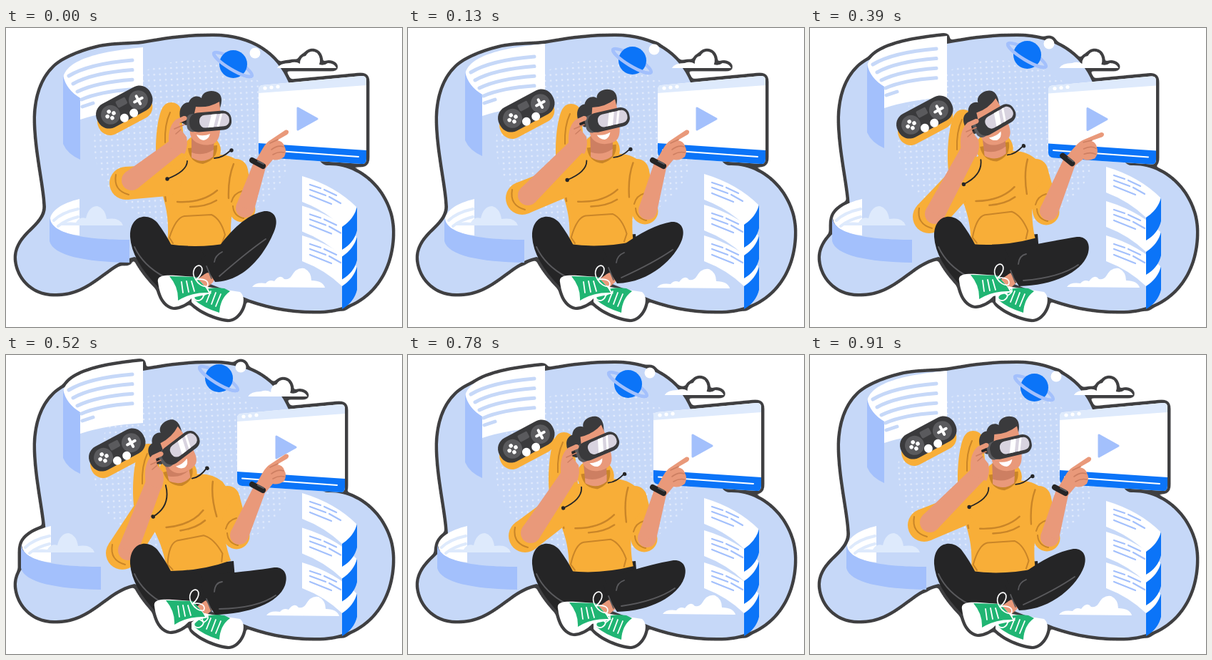
An HTML page that plays this animation: 555x418 px, repeating every 1040 ms.

```html
<!DOCTYPE html>
<html>
<head>
<meta charset="utf-8">
<style>
html, body { margin: 0; height: 100%; overflow: hidden; background: #fff }
svg { display: block; width: 100vw; height: 100vh }
.line { fill: none; stroke-linecap: round; stroke-linejoin: round }
</style>
</head>
<body>
<svg viewBox="0 0 555 418">
  <defs>
    <pattern id="dots" width="8" height="8" patternUnits="userSpaceOnUse" patternTransform="rotate(-3)">
      <circle cx="4" cy="4" r="1.3" fill="#e3ecfc"/>
    </pattern>
    <!-- round outline about 4px wide around everything drawn -->
    <filter id="sticker" filterUnits="userSpaceOnUse" x="0" y="0" width="555" height="418" color-interpolation-filters="sRGB">
      <feGaussianBlur in="SourceAlpha" stdDeviation="3"/>
      <feComponentTransfer result="grown"><feFuncA type="linear" slope="20" intercept="-1.12"/></feComponentTransfer>
      <feFlood flood-color="#3f3f41"/>
      <feComposite in2="grown" operator="in"/>
      <feMerge><feMergeNode/><feMergeNode in="SourceGraphic"/></feMerge>
    </filter>
    <clipPath id="lens"><rect x="271" y="121" width="42" height="18" rx="8"/></clipPath>
  </defs>
  <g id="art" filter="url(#sticker)"></g>
</svg>
<script>
const SKIN = '#e9997a', SHADE = '#cd7f62', YELLOW = '#f8ae38', FOLD = '#c98528', DARK = '#3a3a3c',
  BLACK = '#252526', GREY = '#5a5a5d', BLUE = '#0b74f8', SOFT = '#a3c0fc', PALE = '#deeafc',
  SKY = '#c6d8f8', GREEN = '#20b573', WHITE = '#fff';

const shape = (d, fill) => `<path d="${d}" fill="${fill}"/>`;
const line = (d, color, width = 2) => `<path class="line" d="${d}" stroke="${color}" stroke-width="${width}"/>`;
const disc = (x, y, r, fill) => `<circle cx="${x}" cy="${y}" r="${r}" fill="${fill}"/>`;
const oval = (x, y, rx, ry, fill) => `<ellipse cx="${x}" cy="${y}" rx="${rx}" ry="${ry}" fill="${fill}"/>`;
const box = (x, y, w, h, r, fill) => `<rect x="${x}" y="${y}" width="${w}" height="${h}" rx="${r}" fill="${fill}"/>`;
const group = (transform, ...parts) => `<g transform="${transform}">${parts.join('')}</g>`;
const move = (x, y, ...parts) => group(`translate(${x} ${y})`, ...parts);

// Tapered limb with round ends
function limb([x1, y1], r1, [x2, y2], r2, fill) {
  const a = Math.atan2(y2 - y1, x2 - x1), s = Math.sin(a), c = Math.cos(a);
  return disc(x1, y1, r1, fill) + disc(x2, y2, r2, fill) +
    shape(`M${x1 - s * r1} ${y1 + c * r1}L${x2 - s * r2} ${y2 + c * r2}L${x2 + s * r2} ${y2 - c * r2}L${x1 + s * r1} ${y1 - c * r1}Z`, fill);
}

const blob = shape('M192 22C215 18 245 12 290 12C345 12 380 38 396 76C410 110 430 192 450 192C500 190 541 235 541 285C541 350 500 394 440 395C400 396 360 388 330 375L240 340L180 320C140 328 120 371 70 371C35 372 15 345 15 320C17 287 56 278 56 250C55 220 42 170 42 125C43 95 51 72 67 56C80 43 106 33 132 27C155 23 175 24 192 22Z', SKY) +
  oval(262, 162, 139, 117, 'url(#dots)');

const paper = shape('M80 72C82 42 140 32 192 27V113Q140 116 104 128V98Q84 86 80 72Z', WHITE) +
  shape('M80 66Q84 86 104 98V184Q86 176 80 162Z', SOFT) +
  [0, 1, 2, 3].map(i => line(`M${88 + i * 6} ${67 + i * 11}Q${116 + i * 5} ${50 + i * 13} 177 ${45 + i * 13.6}`, SKY, 5)).join('') +
  line('M107 110L122 105', SKY, 5);

const wall = shape('M62 266C64 255 78 245 103 239V290Q64 286 62 266Z', WHITE) +
  line('M67 269Q78 258 101 253M73 277Q84 268 101 264', PALE, 4) +
  shape('M61 264C62 288 110 296 173 296V328C110 327 66 318 61 298Z', SOFT) +
  shape('M74 276Q82 270 98 272Q103 263 112 266Q116 249 128 249Q139 252 141 267Q160 264 164 276Z', PALE);

const cloud = shape('M380 56Q384 49 398 49Q406 46 412 50Q412 40 420 39Q426 29 436 35Q442 42 439 51Q446 53 451 49Q460 49 463 56Z', WHITE);
const lowCloud = shape('M345 362Q350 355 364 357Q369 351 376 354Q384 343 390 351Q397 352 400 347Q407 334 418 336Q428 341 428 353Q444 353 447 363Z', WHITE);

const planet = group('rotate(31 318 51)', `<ellipse class="line" cx="318" cy="51" rx="31" ry="7" stroke="${SOFT}" stroke-width="4.5"/>`) +
  disc(318.5, 50.5, 19.5, BLUE) +
  group('rotate(31 318 51)', line('M287 51A31 7 0 0 0 349 51', SOFT, 4.5)) + disc(349, 35, 7.5, WHITE);

const browser = shape('M359 80L498 67Q505 66 505 73V183Q505 191 498 190L361 181Q354 180 354 174V86Q354 81 359 80Z', WHITE) +
  shape('M354 91V86Q354 81 359 80L498 67Q505 66 505 73V80Z', PALE) +
  shape('M354 161L505 171V183Q505 191 498 190L361 181Q354 180 354 174Z', BLUE) +
  line('M361 170.5L494 180', WHITE) +
  [0, 1, 2].map(i => disc(363 + i * 9, 84 - i, 2.6, WHITE)).join('') +
  `<path d="M409 112V142L436 127Z" fill="${SOFT}" stroke="${SOFT}" stroke-width="3" stroke-linejoin="round"/>`;

const sheet = y => shape(`M415 ${y}Q462 ${y + 14} 492 ${y + 44}Q486 ${y + 61} 471 ${y + 71}Q447 ${y + 48} 415 ${y + 36}Z`, WHITE) +
  line(`M426 ${y + 12}L441 ${y + 17}M446 ${y + 19}L463 ${y + 27}M426 ${y + 19}L448 ${y + 27}M453 ${y + 29}L469 ${y + 38}M426 ${y + 27}L456 ${y + 39}`, SOFT, 2.2);
const edge = y => shape(`M492 ${y + 43}Q488 ${y + 60} 471 ${y + 71}V${y + 103}Q488 ${y + 93} 492 ${y + 76}Z`, BLUE);

const gamepad = group('translate(166 111) rotate(-28)',
  move(-4, 9, box(-41, -18, 82, 36, 17, YELLOW)),
  box(-42, -19, 84, 37, 17, DARK), box(-8, -13, 15, 10, 2, GREY),
  disc(-22, 0, 13.5, GREY), disc(22, 0, 13.5, GREY),
  line('M16 0H28M22 -6V6', WHITE, 4),
  [[-5, 0], [5, 0], [0, -5], [0, 5]].map(([x, y]) => disc(x - 22, y, 2.8, WHITE)).join(''),
  disc(-7, 13, 6, WHITE), disc(8, 13, 6, WHITE));

const hood = shape('M211 190C208 160 212 128 218 114C224 100 240 102 245 113L252 185L225 200Z', YELLOW) +
  line('M230 118Q222 135 223 160', FOLD);

const torso = oval(275, 171, 26, 23, YELLOW) +
  shape('M213 215C225 194 240 184 254 180L262 188Q276 194 292 182L300 177Q320 178 332 192Q338 204 336 222L320 240C315 262 314 285 316 300Q270 309 226 302C229 270 226 250 213 215Z', YELLOW) +
  shape('M255 168L296 164Q297 184 276 190Q257 188 255 168Z', FOLD) +
  shape('M260 152L292 155L290 180Q275 190 260 180Z', SHADE) +
  shape('M260 174Q276 180 291 170L290 180Q275 191 260 181Z', SKIN) +
  line('M229 293Q238 265 250 263L288 261Q301 267 307 289M229 293L234 301M307 289L303 300', FOLD) +
  line('M240 243Q275 245 296 227M258 250Q280 250 295 241M319 190Q311 210 312 238M222 228L224 242', FOLD, 2.4);

const cords = drop => line(`M254 186Q254 ${200 + drop} 226 ${211 + drop}M292 182Q303 182 315 171`, BLACK, 1.8) +
  disc(226, 211 + drop, 2.7, BLACK) + disc(316, 171, 2.7, BLACK);

const head = shape('M256 126L300 124C301 145 300 158 290 162C278 166 261 162 258 148Z', SKIN) +
  shape('M246 132C240 118 245 104 256 104C260 94 270 94 274 98C275 87 292 85 299 92C305 99 301 110 297 120L262 120L258 134L252 136Z', DARK) +
  shape('M263 124L266 110Q284 112 299 103L301 122Z', SKIN) +
  shape('M267 149Q277 152 286 148Q284 156 277 157Q270 156 267 149Z', WHITE) +
  line('M245 130L260 128', BLACK, 5) +
  group('rotate(-5 286 130)', box(253, 118, 20, 25, 8, GREY), box(257, 117, 59, 27, 12, DARK),
    box(271, 121, 42, 18, 8, '#d8d3df'),
    `<g clip-path="url(#lens)">${line('M285 143L294 117', WHITE, 7)}${line('M295 143L304 117', WHITE, 3)}</g>`);

const earHand = shape('M229 168C226 150 229 136 238 128L249 123C255 122 255 129 250 130L243 133L245 142L253 152C255 160 253 172 250 176Z', SKIN) +
  line('M236 141L250 135M238 148L245 142', SHADE, 1.6);

const pointHand = shape('M351 184C358 172 362 162 370 157L391 143C396 141 398 146 394 149L380 157Q388 158 390 165Q394 172 390 180Q382 186 374 184L364 196Z', SKIN) +
  line('M370 161L381 156M372 170Q381 163 389 166M374 177Q382 172 390 174', SHADE, 1.6) +
  line('M345 185L360 193', BLACK, 8) + line('M353 186L361 190', GREY, 2);

const hips = shape('M222 297L319 288L322 325L280 350L230 340Z', BLACK);
const leftLeg = shape('M174 292C173 262 198 257 212 272Q224 288 232 304L272 306L288 340L272 372L214 363Q176 325 174 292Z', BLACK) +
  line('M180 306Q192 332 222 348', GREY, 1.8);

const leftShoe = shape('M213 355C211 346 223 345 238 346L266 348Q280 362 288 371L261 377Q250 389 235 390C221 387 215 371 213 355Z', WHITE) +
  shape('M229 347L266 348Q280 361 284 370Q260 369 241 381Q242 362 229 347Z', GREEN) +
  line('M246 355L248 370M253 354L256 369M260 354L264 368', WHITE, 1.8) +
  line('M266 352C258 341 266 329 273 333C278 338 272 348 266 352C277 349 286 354 282 361C276 363 269 357 266 352', WHITE, 1.7);

const rightShoe = shape('M260 374L276 361L328 369C340 378 328 406 312 407C295 405 272 396 260 383Z', WHITE) +
  shape('M264 376Q278 360 306 364L314 368Q300 378 299 398Q276 391 264 380Z', GREEN) +
  line('M281 383L287 368M288 386L294 370M294 389L301 372', WHITE, 1.8) +
  line('M277 374C267 364 262 372 264 379C270 384 276 379 277 374C270 362 281 358 283 366C284 370 280 372 277 374', WHITE, 1.7);

// Five poses from leaning right (0) to leaning left (4)
const pose = {
  planet: [[0, 0], [-4, -5], [-10, -10], [-14, -13], [-20, -18]],
  browser: [[0, 0], [-4, 0], [-10, 0], [-20, .5], [-30, 2]],
  paper: [0, -5, -12, -16, -18],
  sheet: [0, -3, -7, -13, -14],
  lowCloud: [[0, 0], [4, 1], [12, 0], [15, 0], [20, 2]],
  gamepad: [[0, 0], [0, 5], [0, 10], [-5, 14], [-10, 22]],
  lean: [0, -4, -12, -16, -33],
  hood: [[0, 0], [-3, 2], [-13, 4], [-17, 10], [-32, 20]],
  head: [[0, 0, 0], [-2, -1, -8], [-12, -1, -18], [-16, 0, -25], [-29, 1, -32]],
  elbow: [[168, 217], [160, 238], [164, 253], [167, 264], [163, 277]],
  earHand: [[0, 0], [-3, 0], [-14, 2], [-17, 4], [-33, 12]],
  rightElbow: [[331, 253], [332, 256], [331, 257], [331, 257], [323, 253]],
  pointHand: [[0, 0, 0], [-2, 0, 0], [-2, 0, 0], [8, -4, 11], [0, -4, 0]],
  knee: [[360, 275], [367, 290], [370, 306], [372, 311], [374, 316]],
  shoe: [[0, 0], [0, 0], [-3, -1], [-4, -2], [-5, -4]]
};

function rightLeg([x, y], k) {
  const ax = 290, ay = 342 + k * 2;
  return shape(`M274 322L298 306Q${x - 28} ${y - 14} ${x + 2} ${y - 19}C${x + 16} ${y - 20} ${x + 22} ${y - 9} ${x + 17} ${y + 6}C${x + 8} ${y + 31} ${ax + 50} ${ay + 12} ${ax + 3} ${ay + 13}L${ax - 11} ${ay - 9}Z`, BLACK) +
    line(`M${ax + 9} ${ay + 5}Q${x - 22} ${y + 38} ${x + 4} ${y + 20}M292 ${327 + k}Q293 318 303 ${313 + k}M281 ${ay - 9}L288 ${ay + 8}`, GREY, 1.8);
}

function draw(k) {
  const p = Object.fromEntries(Object.entries(pose).map(([name, list]) => [name, list[k]]));
  const tilt = p.lean / 128, [hx, hy] = p.earHand, [px, py, turn] = p.pointHand;
  const [ex, ey] = p.elbow, [rx, ry] = p.rightElbow;
  const sheets = [207 + p.sheet, 248.5 + p.sheet / 2, 290];
  const leaning = `matrix(1 ${tilt * .55} ${-tilt} 1 ${303 * tilt} ${-226 * tilt * .55})`;
  return blob +
    move(0, p.paper, paper) + move(-10 * k, 0, wall) +
    move(...p.planet, planet) + move(-10.2 * k, k > 3 ? 2 : 0, cloud) +
    sheets.map(sheet).join('') + sheets.map(edge).join('') +
    move(...p.browser, browser) + move(...p.lowCloud, lowCloud) +
    move(...p.hood, hood) + move(...p.gamepad, gamepad) +
    hips + limb([322 + p.lean * .35, 200], 17, p.rightElbow, 18.5, YELLOW) +
    group(leaning, torso) +
    line(`M${rx - 15} ${ry - 10}Q${rx - 12} ${ry - 22} ${rx} ${ry - 25}M${rx - 13} ${ry - 4}Q${rx - 12} ${ry + 10} ${rx + 2} ${ry + 13}`, FOLD) +
    limb([rx + 4, ry - 1], 13, [356 + px, 190 + py], 9, SKIN) +
    group(`translate(${px} ${py}) rotate(${turn} 358 190)`, pointHand) +
    group(`translate(${p.head[0]} ${p.head[1]}) rotate(${p.head[2]} 277 152)`, head) +
    limb([224 + p.lean * .6, 213], 22, p.elbow, 23, YELLOW) +
    line(`M${ex - 14} ${ey - 12}Q${ex - 18} ${ey + 10} ${ex + 4} ${ey + 16}`, FOLD) +
    limb([ex + 8, ey - 4], 14, [242 + hx, 163 + hy], 11.5, SKIN) +
    move(hx, hy, earHand) + group(leaning, cords(p.hood[1] * .75)) +
    leftLeg + limb([284, 350], 8, [274, 358], 9, SKIN) + rightLeg(p.knee, k) +
    rightShoe + move(...p.shoe, leftShoe);
}

const art = document.getElementById('art');
const poses = [0, 1, 2, 3, 4].map(draw);
let shown = -1;
function tick() {
  const step = Math.floor(performance.now() % 1040 / 130);
  const k = 4 - Math.abs(4 - step);
  if (k !== shown) art.innerHTML = poses[shown = k];
  requestAnimationFrame(tick);
}
tick();
</script>
</body>
</html>
```
